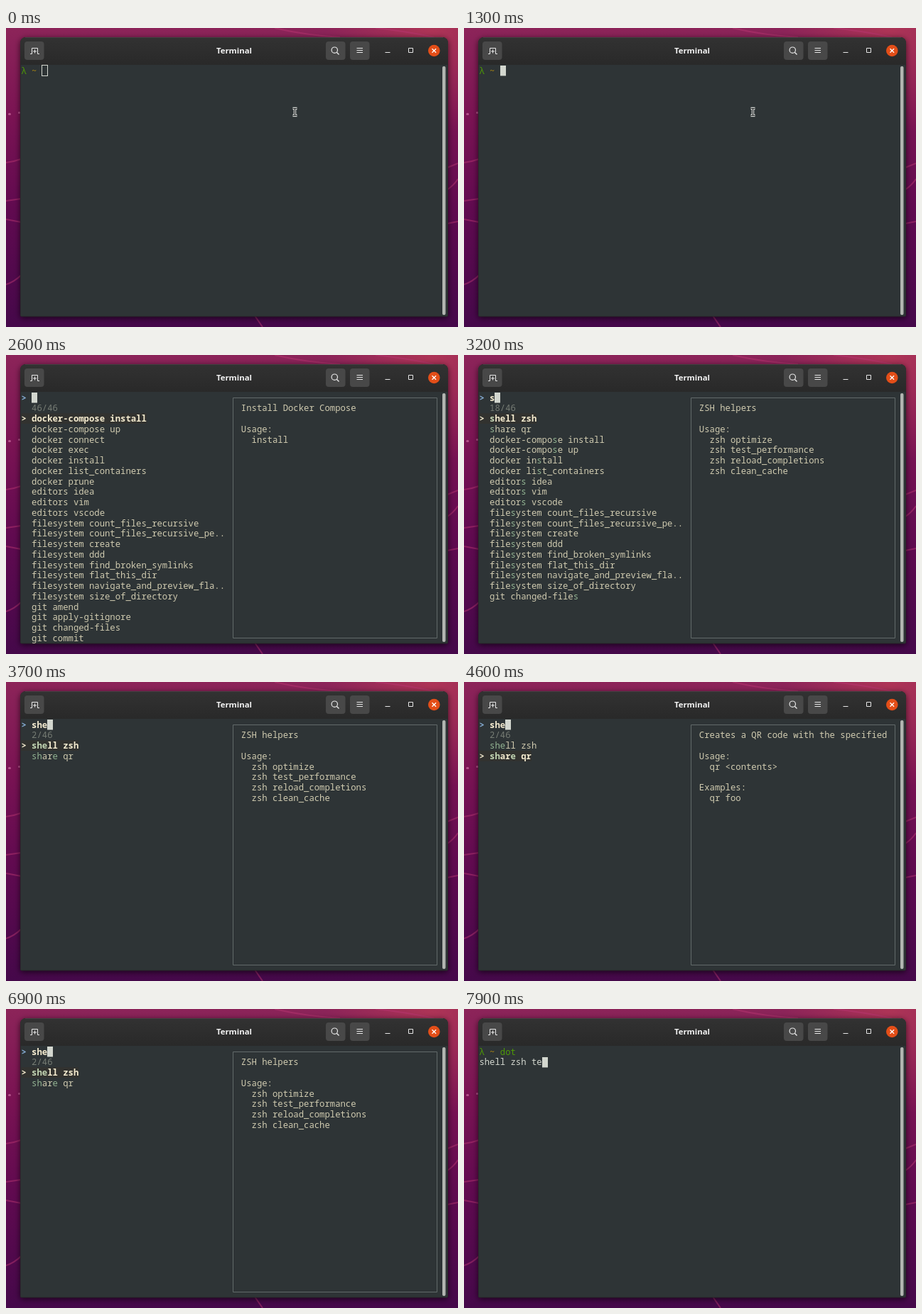
An HTML page with a canvas that plays this animation: 636 by 422 pixels, repeating every 8000 ms.

```html
<!DOCTYPE html>
<html lang="en">
<head>
<meta charset="utf-8">
<title>Terminal</title>
<style>
  html, body { margin: 0; width: 100%; height: 100%; overflow: hidden; background: #5c0a4e; }
  canvas { display: block; }
</style>
</head>
<body>
<canvas id="stage" width="636" height="422"></canvas>
<script>
const ctx = document.getElementById('stage').getContext('2d');
const LOOP = 8000, CELL = 7.35, ROW = 14.75, LEFT = 21.4, TOP = 52.8;
const MONO = '12.25px "Noto Sans Mono", "DejaVu Sans Mono", monospace';
const C = {
  body: '#2e3436', green: '#4e9a06', tilde: '#b08a10', red: '#cc0000', yellow: '#c4a000',
  plain: '#d3d7cf', item: '#d0cbb0', bright: '#f5ecd0', match: '#93b493', matchOn: '#c3d6b4',
  info: '#767c74', prompt: '#87afd7', current: '#32322f', frame: '#626a6a'
};

// Times of key presses; the cursor blink restarts at each one.
const KEYS = [1300, 1500, 1700, 1900, 2400, 3200, 3400, 3600, 4300, 5400, 7000, 7600, 7800];
const OPEN = 2400, DOWN = 4300, UP = 5400, ACCEPT = 7000;

const COMMANDS = `docker-compose install
docker-compose up
docker connect
docker exec
docker install
docker list_containers
docker prune
editors idea
editors vim
editors vscode
filesystem count_files_recursive
filesystem count_files_recursive_pe..
filesystem create
filesystem ddd
filesystem find_broken_symlinks
filesystem flat_this_dir
filesystem navigate_and_preview_fla..
filesystem size_of_directory
git amend
git apply-gitignore
git changed-files
git commit`.split('\n');
const BEST = ['shell zsh', 'share qr'];
const HELP = {
  'docker-compose install': ['Install Docker Compose', '', 'Usage:', '  install'],
  'shell zsh': ['ZSH helpers', '', 'Usage:', '  zsh optimize', '  zsh test_performance',
    '  zsh reload_completions', '  zsh clean_cache'],
  'share qr': ['Creates a QR code with the specified', '', 'Usage:', '  qr <contents>', '',
    'Examples:', '  qr foo']
};

function rect(x, y, w, h, color, r = 0) {
  ctx.fillStyle = color;
  ctx.beginPath();
  ctx.roundRect(x, y, w, h, r);
  ctx.fill();
}

function stroke(d, color, width = 1) {
  ctx.strokeStyle = color;
  ctx.lineWidth = width;
  ctx.stroke(new Path2D(d));
}

function text(col, row, str, color, bold) {
  ctx.font = (bold ? 'bold ' : '') + MONO;
  ctx.fillStyle = color;
  ctx.fillText(str, LEFT + col * CELL, TOP + row * ROW + 11.7);
}

function cursor(col, row, hollow) {
  const x = Math.round(LEFT + col * CELL), y = Math.round(TOP + row * ROW);
  if (hollow) {
    ctx.strokeStyle = C.plain;
    ctx.lineWidth = 1;
    ctx.strokeRect(x - .5, y - .5, 8, 15);
  } else rect(x, y, 8, 14.5, C.plain);
}

function wallpaper() {
  const g = ctx.createLinearGradient(0, 0, 0, 422);
  g.addColorStop(0, '#8c2459');
  g.addColorStop(.3, '#7a1353');
  g.addColorStop(.6, '#610a50');
  g.addColorStop(1, '#45084a');
  rect(0, 0, 636, 422, g);
  const glow = ctx.createRadialGradient(600, 0, 5, 600, 0, 150);
  glow.addColorStop(0, 'rgba(190,60,85,.65)');
  glow.addColorStop(1, 'rgba(190,60,85,0)');
  rect(440, 0, 196, 150, glow);
  const vein = 'rgba(185,55,115,.5)';
  stroke('M0 190Q10 189 21 185M0 244L21 241M0 270L21 274M0 362Q12 358 21 349', vein, 2);
  stroke('M621 197L636 191M621 228Q630 222 636 213M621 276L636 273', vein, 2);
  stroke('M350 406L361 422M378 0Q420 10 470 13M520 0Q560 4 602 13', vein, 2);
  rect(3, 120, 4, 3, '#b4528a', 2);
  rect(17, 118, 3, 3, '#b4528a', 2);
}

function chrome() {
  ctx.save();
  ctx.shadowColor = 'rgba(0,0,0,.65)';
  ctx.shadowBlur = 9;
  ctx.shadowOffsetY = 2;
  rect(20, 13, 602, 394.5, '#292b2b', [8, 8, 2, 2]);
  ctx.restore();
  const bar = ctx.createLinearGradient(0, 13, 0, 52);
  bar.addColorStop(0, '#323232');
  bar.addColorStop(1, '#292929');
  rect(20, 13, 602, 39, bar, [8, 8, 0, 0]);
  stroke('M27 13.5H615', '#414141');
  rect(21, 52, 600, 354.5, C.body);
  rect(614, 54, 4.5, 351, '#b2b5b1', 2);

  for (const x of [26, 450, 484]) rect(x, 19, 27.5, 26, '#484848', 4);
  const ink = '#e8e8e8';
  stroke('M34 36.5H36.5V28.5H44.5V36.5H47M38 33H43M40.5 30.5V35.5', ink);
  ctx.beginPath();
  ctx.arc(462.3, 31.2, 4.2, 0, 7);
  ctx.strokeStyle = ink;
  ctx.lineWidth = 1.2;
  ctx.stroke();
  stroke('M465.3 34.2L468.5 37.4', ink, 1.4);
  stroke('M493.5 28.5H502M493.5 31.5H502M493.5 34.5H502', ink, 1.2);
  stroke('M533.5 34.5H540.5M566.5 28.5H572.5V34.5H566.5Z', ink);
  ctx.fillStyle = '#e34e18';
  ctx.beginPath();
  ctx.arc(602.3, 32, 8.3, 0, 7);
  ctx.fill();
  stroke('M599.5 29.2L605.1 34.8M605.1 29.2L599.5 34.8', '#fff', 1.3);

  ctx.font = 'bold 11.4px "Noto Sans", "Open Sans", sans-serif';
  ctx.textAlign = 'center';
  ctx.fillStyle = '#f2f2f2';
  ctx.fillText('Terminal', 321, 36);
  ctx.textAlign = 'left';
}

function pointer(x, y) {
  const d = `M${x - 3} ${y - 5}H${x + 3}M${x} ${y - 5}V${y + 5}M${x - 3} ${y + 5}H${x + 3}`;
  stroke(d, '#d8dad6', 3.4);
  stroke(d, '#202426', 1.2);
}

// Positions of the query letters in str, or null if it does not match.
function match(str, query) {
  const hits = [];
  let at = -1;
  for (const ch of query) {
    at = str.indexOf(ch, at + 1);
    if (at < 0) return null;
    hits.push(at);
  }
  return hits;
}

function finder(t, blinkOn) {
  const query = 'she'.slice(0, [3200, 3400, 3600].filter(k => t >= k).length);
  const list = query ? [...BEST, ...COMMANDS].filter(s => match(s, query)) : COMMANDS;
  const chosen = t >= DOWN && t < UP ? 1 : 0;

  text(0, 0, '>', C.prompt, true);
  text(2, 0, query, C.bright, true);
  if (blinkOn) cursor(2 + query.length, 0);
  text(2, 1, `${query ? list.length : 46}/46`, C.info);

  list.forEach((name, i) => {
    const on = i === chosen, row = i + 2;
    if (on) {
      rect(LEFT, TOP + row * ROW, (name.length + 2) * CELL, ROW, C.current);
      text(0, row, '>', C.bright, true);
    }
    const hits = match(name, query);
    [...name].forEach((ch, j) => {
      const color = hits.includes(j) ? (on ? C.matchOn : C.match) : (on ? C.bright : C.item);
      text(2 + j, row, ch, color, on);
    });
  });

  stroke('M319.5 60.5H606.5V399.5H319.5Z', C.frame);
  HELP[list[chosen]].forEach((line, i) => text(42.1, i + 1, line, C.item));
}

function shell(t, blinkOn) {
  text(0, 0, 'λ', C.green);
  text(2, 0, '~', C.tilde);
  const n = [1500, 1700, 1900].filter(k => t >= k).length;
  text(4, 0, 'dot'.slice(0, n), [C.plain, C.red, C.yellow, C.green][n]);
  if (t >= ACCEPT) {
    const line = 'shell zsh te'.slice(0, 10 + (t >= 7600) + (t >= 7800));
    text(0, 1, line, C.plain);
    if (blinkOn) cursor(line.length, 1);
  } else if (t < KEYS[0]) cursor(4, 0, true);
  else if (blinkOn) cursor(4 + n, 0);
  if (t < 1500) pointer(406.5, 118.5);
}

function draw(now) {
  const t = now % LOOP;
  const last = KEYS.filter(k => k <= t).pop() || 0;
  const blinkOn = Math.floor((t - last) / 600) % 2 === 0;
  wallpaper();
  chrome();
  (t >= OPEN && t < ACCEPT ? finder : shell)(t, blinkOn);
}

const start = performance.now();
function tick() {
  draw(performance.now() - start);
  requestAnimationFrame(tick);
}
tick();
</script>
</body>
</html>
```
